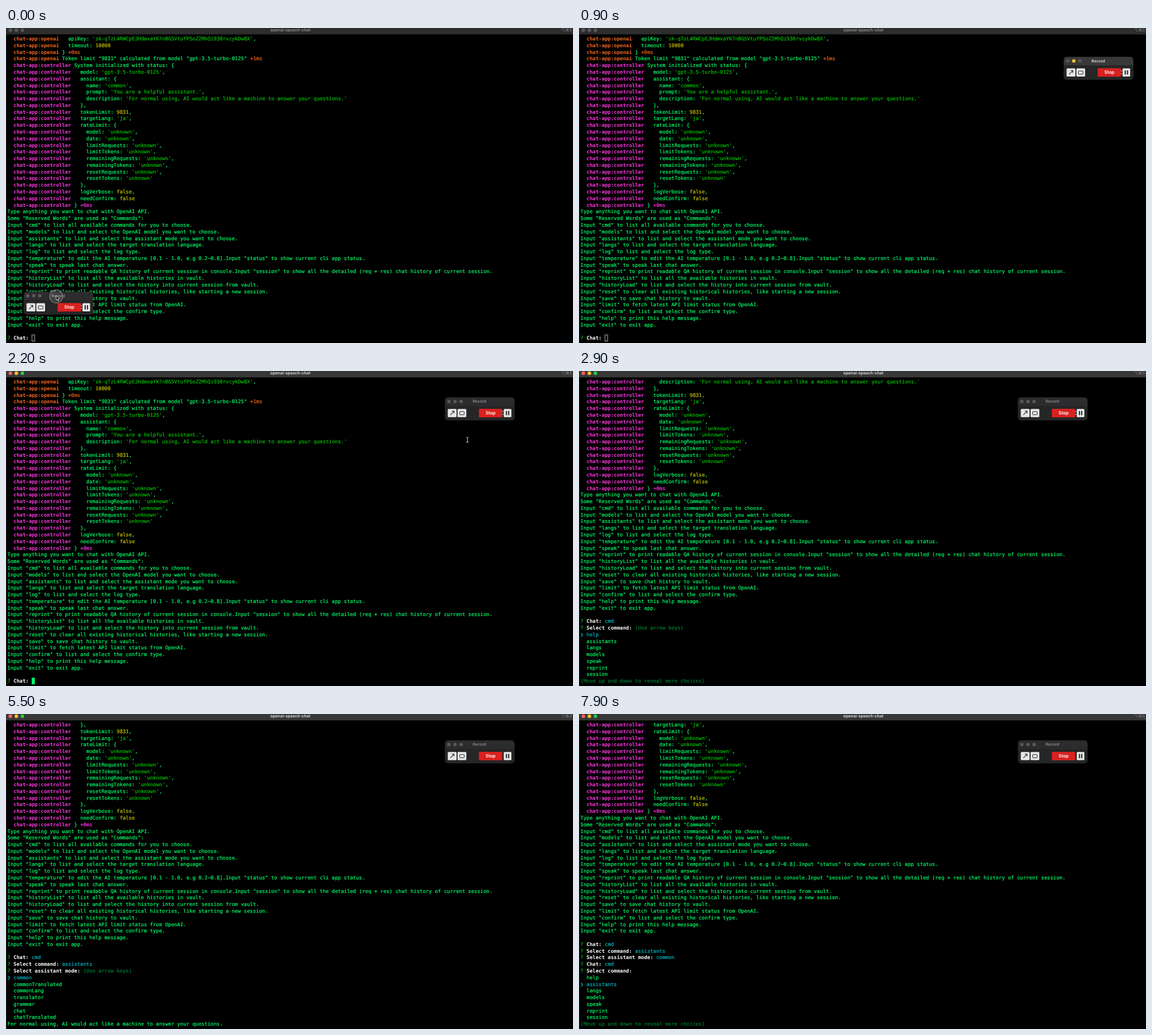
Write an HTML page that moves like this. It is 1003 px wide and 558 px high and loops after 8 s.

```html
<!DOCTYPE html>
<html lang="en">
<head>
<meta charset="utf-8">
<title>openai-speech-chat</title>
<style>
  html, body { margin: 0; width: 100%; height: 100%; overflow: hidden; background: #000; }
  svg { display: block; width: 1003px; height: 558px; }
  text { white-space: pre; text-rendering: geometricPrecision; }
  #term text {
    font: 8.914px "DejaVu Sans Mono", monospace;
    fill: currentColor; stroke: currentColor; stroke-width: 0.22px;
  }
  #term .b { font-weight: 700; stroke: none; }
  .ui { font-family: Inter, sans-serif; font-weight: 600; text-anchor: middle; }
</style>
</head>
<body>
<svg viewBox="0 0 1003 558">
  <rect width="1003" height="558" fill="#000"/>
  <g id="term"></g>
  <rect width="0.6" height="558" fill="#3a3a3a"/>
  <rect id="head" width="1003" height="11.3"/>
  <g id="lights">
    <circle cx="7.7" cy="3.9" r="3.2"/>
    <circle cx="18.3" cy="3.9" r="3.2"/>
    <circle cx="29" cy="3.9" r="3.2"/>
  </g>
  <text id="title" class="ui" x="503" y="6.3" font-size="7.2">openai-speech-chat</text>
  <text class="ui" x="991.5" y="6" font-size="7" fill="#8a8a8a" style="font-weight:400">⌥⌘3</text>

  <g id="panel">
    <rect x="0.25" y="0.25" width="122.5" height="40" rx="5" fill="#262627" stroke="#3c3c3d" stroke-width="0.5"/>
    <path id="bar" d="M.5 15V5a4.5 4.5 0 0 1 4.5-4.5H118a4.5 4.5 0 0 1 4.5 4.5V15Z"/>
    <circle cx="7" cy="7.3" r="3.1" fill="#58585a"/>
    <circle id="mini" cx="17.8" cy="7.3" r="3.1"/>
    <circle cx="28.6" cy="7.3" r="3.1" fill="#58585a"/>
    <text id="name" class="ui" x="61" y="9.8" font-size="7">Record</text>
    <g fill="#e6e6e6">
      <rect x="5" y="20.5" width="15.5" height="14.5" rx="1.5"/>
      <rect x="22.3" y="20.5" width="15.5" height="14.5" rx="1.5"/>
      <rect x="104" y="20.5" width="13.5" height="14.5" rx="1.5"/>
    </g>
    <path d="M9.5 31.2L15.8 24.6M12 24.3H16.1V28.4" fill="none" stroke="#222" stroke-width="1.1"/>
    <rect x="26" y="25.2" width="8" height="5.6" rx="0.8" fill="none" stroke="#222"/>
    <path d="M108.8 24v7.6M112.8 24v7.6" stroke="#222" stroke-width="2"/>
    <rect x="60" y="20.3" width="41.3" height="14.9" rx="1" fill="#d9211f"/>
    <text class="ui" x="80.6" y="30.3" font-size="8" fill="#fff">Stop</text>
    <path id="dots" d="M101.2 25h1.6M101.2 30h1.6" stroke="#ddd" stroke-width="1.6"/>
  </g>

  <g id="arrow">
    <circle id="ring" cx="0" cy="0.5" r="11.5" fill="#fff" fill-opacity="0.1" stroke="#808080" stroke-width="1.3"/>
    <path d="M0 -1V7L1.8 5.4L3.1 8.3L4.5 7.7L3.2 4.9H5.7Z" fill="#000" stroke="#fff" stroke-width="0.8"/>
  </g>
  <path id="beam" d="M-2 -4.3Q0 -4.3 0 -3Q0 -4.3 2 -4.3M0 -3V3M-2 4.3Q0 4.3 0 3Q0 4.3 2 4.3"
        fill="none" stroke="#c8c8c8" stroke-width="1.1"/>
</svg>
<script>
const $ = id => document.getElementById(id);
const LOOP = 8000, STEP = 100;
const X0 = 2.6, CW = 5.366, ROW = 11.78, BASE = 22.1, TOP = 13.2;
const C = {
  fg: '#00ff6a', str: '#00c200', num: '#c7c400', cyan: '#00b8c4', dim: '#007d32',
  white: '#fff', openai: '#f0641e', controller: '#fb35dd'
};

const logs = `openai|  apiKey: 'sk-qTzL4RWCpEJHdmxaYK7nBG5VtufPSoZ2MhQi930rvcykDw8X',
openai|  timeout: 10000
openai|} +0ms
openai|Token limit "9831" calculated from model "gpt-3.5-turbo-0125" +1ms
controller|System initialized with status: {
controller|  model: 'gpt-3.5-turbo-0125',
controller|  assistant: {
controller|    name: 'common',
controller|    prompt: 'You are a helpful assistant.',
controller|    description: 'For normal using, AI would act like a machine to answer your questions.'
controller|  },
controller|  tokenLimit: 9831,
controller|  targetLang: 'ja',
controller|  rateLimit: {
controller|    model: 'unknown',
controller|    date: 'unknown',
controller|    limitRequests: 'unknown',
controller|    limitTokens: 'unknown',
controller|    remainingRequests: 'unknown',
controller|    remainingTokens: 'unknown',
controller|    resetRequests: 'unknown',
controller|    resetTokens: 'unknown'
controller|  },
controller|  logVerbose: false,
controller|  needConfirm: false
controller|} +0ms`.split('\n');

const help = `Type anything you want to chat with OpenAI API.
Some "Reserved Words" are used as "Commands":
Input "cmd" to list all available commands for you to choose.
Input "models" to list and select the OpenAI model you want to choose.
Input "assistants" to list and select the assistant mode you want to choose.
Input "langs" to list and select the target translation language.
Input "log" to list and select the log type.
Input "temperature" to edit the AI temperature [0.1 - 1.0, e.g 0.2~0.8].Input "status" to show current cli app status.
Input "speak" to speak last chat answer.
Input "reprint" to print readable QA history of current session in console.Input "session" to show all the detailed (req + res) chat history of current session.
Input "historyList" to list all the available histories in vault.
Input "historyLoad" to list and select the history into current session from vault.
Input "reset" to clear all existing historical histories, like starting a new session.
Input "save" to save chat history to vault.
Input "limit" to fetch latest API limit status from OpenAI.
Input "confirm" to list and select the confirm type.
Input "help" to print this help message.
Input "exit" to exit app.
`.split('\n');

const commands = ['help', 'assistants', 'langs', 'models', 'speak', 'reprint', 'session'];
const modes = ['common', 'commonTranslated', 'commonLang', 'translator', 'grammar', 'chat', 'chatTranslated'];

// A line is a list of [text, colour, bold] spans.
function logLine(s) {
  const [mod, body] = s.split('|');
  const parts = body.split(/('[^']*'|\b\d+(?=,?$)|\bfalse\b|\+\dms)/);
  return [['  '], ['chat-app:' + mod, C[mod], 1], [' '], ...parts.map(p =>
    [p, p[0] === "'" ? C.str : /^\+\d/.test(p) ? C[mod] : /^(\d+|false)$/.test(p) ? C.num : C.fg])];
}
const ask = (label, answer = '', color = C.cyan) =>
  [['?', C.str], [' '], [label, C.white, 1], [' '], [answer, color]];
const list = (items, on) => items.map((s, i) =>
  i === on ? [['❯ ', C.cyan], [s, C.cyan]] : [['  '], [s, C.fg]]);
const plain = (s, color = C.fg) => [[s, color]];

const intro = [...logs.map(logLine), ...help.map(s => plain(s))];
const USE = '(Use arrow keys)', MORE = '(Move up and down to reveal more choices)';
const chat = ask('Chat:', 'cmd');
const chosen = ask('Select command:', 'assistants');

function commandMenu(moved) {
  return [ask('Select command:', moved ? '' : USE, C.dim), ...list(commands, moved ? 1 : 0), plain(MORE, C.dim)];
}
const typed = (t, start) => 'cmd'.slice(0, Math.max(0, Math.floor((t - start) / 100) + 1));

// Prompt lines, scrolled rows and cursor column (-1 hides it).
function session(t) {
  if (t < 2900) {
    const s = typed(t, 2500);
    return { lines: [ask('Chat:', s, C.fg)], scroll: 0, cur: 8 + s.length };
  }
  if (t < 4300) return { lines: [chat, ...commandMenu(t >= 3600)], scroll: 9, cur: -1 };
  if (t < 6200) return {
    lines: [chat, chosen, ask('Select assistant mode:', USE, C.dim), ...list(modes, 0),
      plain('For normal using, AI would act like a machine to answer your questions.')],
    scroll: 10, cur: -1
  };
  const done = [chat, chosen, ask('Select assistant mode:', 'common')];
  if (t < 7400) {
    const s = typed(t, 7000);
    return { lines: [...done, ask('Chat:', s, C.fg)], scroll: 10, cur: 8 + s.length };
  }
  return { lines: [...done, chat, ...commandMenu(t >= 7700)], scroll: 12, cur: -1 };
}

const esc = s => s.replace(/&/g, '&amp;').replace(/</g, '&lt;');
function lineMarkup(spans, row) {
  let col = 0, out = '';
  for (const [s, color, bold] of spans) {
    if (s.trim()) {
      const lead = s.length - s.trimStart().length;
      out += `<text x="${(X0 + (col + lead) * CW).toFixed(2)}" y="${(BASE + row * ROW).toFixed(2)}" color="${color}"` +
        `${bold ? ' class="b"' : ''}>${esc(s.trim())}</text>`;
    }
    col += s.length;
  }
  return out;
}

let lastTerm = '';
function drawTerm(t, focused) {
  const { lines, scroll, cur } = session(t);
  const all = [...intro, ...lines].slice(scroll);
  let out = all.map(lineMarkup).join('');
  if (cur >= 0) {
    const x = X0 + cur * CW, y = TOP + (all.length - 1) * ROW;
    out += focused
      ? `<rect x="${x}" y="${y}" width="${CW}" height="${ROW}" fill="${C.fg}"/>`
      : `<rect x="${x + 0.4}" y="${y + 0.4}" width="${CW - 0.5}" height="${ROW - 0.8}" fill="none" stroke="#c4c4c4" stroke-width="0.9"/>`;
  }
  if (out !== lastTerm) $('term').innerHTML = lastTerm = out;
}

// Keys are [time, x, y], eased between neighbours.
function along(keys, t) {
  let i = 0;
  while (i < keys.length - 2 && t >= keys[i + 1][0]) i++;
  const [t0, x0, y0] = keys[i], [t1, x1, y1] = keys[i + 1];
  const u = Math.min(1, Math.max(0, (t - t0) / (t1 - t0))), k = u * u * (3 - 2 * u);
  return [x0 + (x1 - x0) * k, y0 + (y1 - y0) * k];
}
const panelPath = [[0, 31.3, 467], [700, 882, 54], [900, 857.5, 51], [1400, 776.5, 46.7]];
const pointerPath = [[1400, 834, 55], [1700, 816, 122]];

const place = (id, [x, y]) => $(id).setAttribute('transform', `translate(${x.toFixed(2)} ${y.toFixed(2)})`);
const show = (id, on) => $(id).setAttribute('display', on ? 'inline' : 'none');
const fill = (el, color) => el.setAttribute('fill', color);

function draw(t) {
  const focused = t >= 1700, panelOn = t >= 800 && !focused;
  drawTerm(t, focused);

  ['#ff5f57', '#febc2e', '#28c840'].forEach((c, i) => fill($('lights').children[i], focused ? c : '#565656'));
  fill($('head'), focused ? '#383838' : '#2d2d2d');
  fill($('title'), focused ? '#e4e4e4' : '#949494');

  const p = along(panelPath, t);
  place('panel', p);
  fill($('bar'), panelOn ? '#39393a' : '#2c2c2e');
  fill($('mini'), panelOn ? '#febc2e' : '#58585a');
  fill($('name'), panelOn ? '#dcdcdc' : '#8c8c8c');
  show('dots', t < 4100);

  show('arrow', t < 800 || (t >= 1000 && t < 1700));
  show('ring', t < 1400);
  place('arrow', t < 1400 ? [p[0] + 57.5, p[1] + 8] : along(pointerPath, t));
  show('beam', t >= 1700 && t < 2500);
  place('beam', [816.3, 122]);
}

function tick(now) {
  draw(Math.floor((now % LOOP) / STEP) * STEP);
  requestAnimationFrame(tick);
}
draw(0);
requestAnimationFrame(tick);
</script>
</body>
</html>
```
